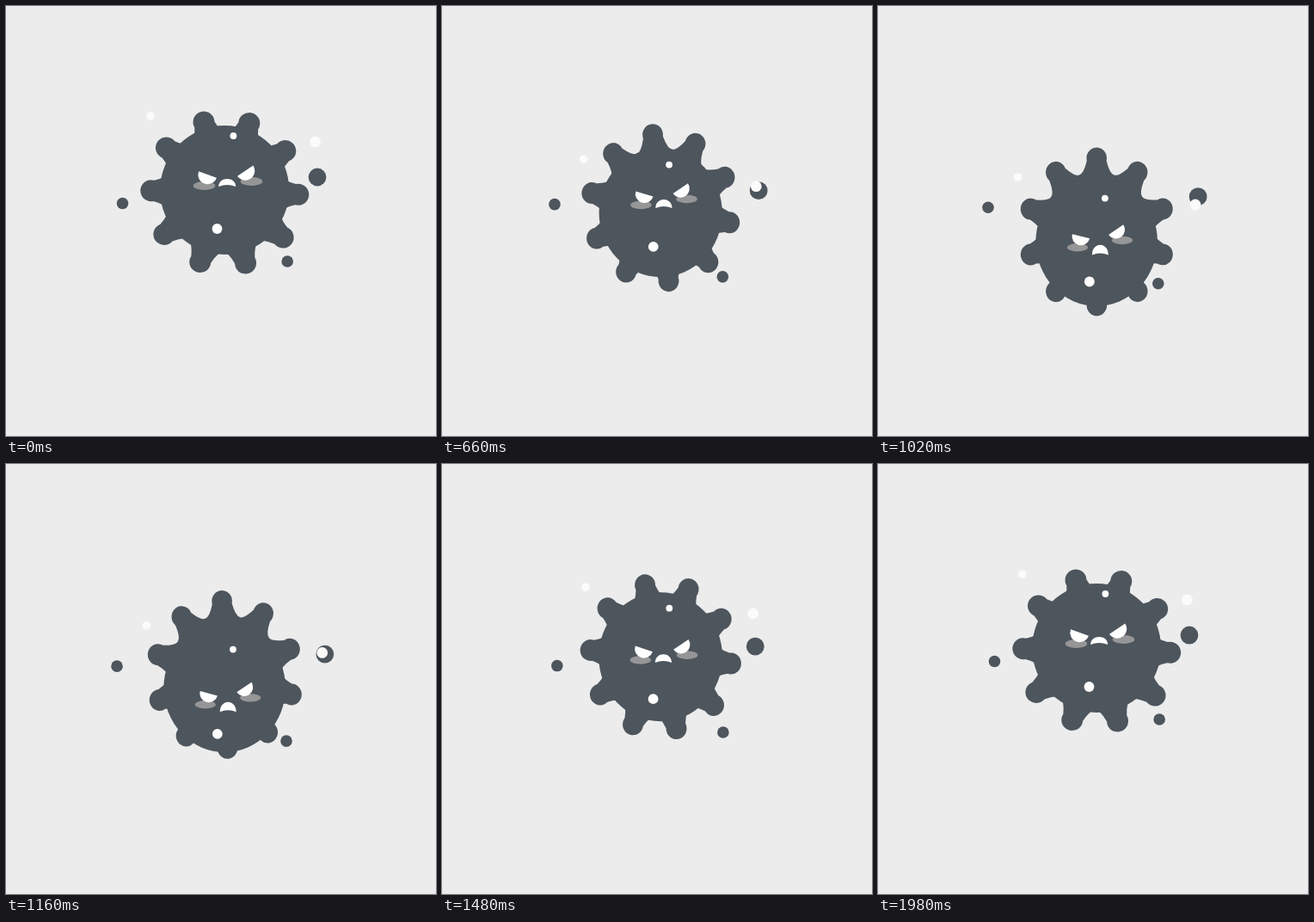
Write an HTML page with a canvas that moves like this. It is 500x500 px and loops after 2000 ms.

```html
<!DOCTYPE html>
<html>
<head>
<meta charset="utf-8">
<style>
html, body { margin: 0; width: 100%; height: 100%; overflow: hidden; background: #ececec; }
canvas { display: block; }
</style>
</head>
<body>
<canvas width="500" height="500"></canvas>
<script>
const ctx = document.querySelector('canvas').getContext('2d');
const DARK = '#4d555d', LIGHT = '#fbfbfb', WHITE = '#fff', BLUSH = '#969697';
const LOOP = 2000, RAD = Math.PI / 180;

// Easing like cubic-bezier(x1, 0, x2, 1), solved by bisection
const ease = (x1, x2) => x => {
  let lo = 0, hi = 1, u;
  for (let i = 0; i < 20; i++) {
    u = (lo + hi) / 2;
    const at = 3 * u * (1 - u) * ((1 - u) * x1 + u * x2) + u ** 3;
    if (at < x) lo = u; else hi = u;
  }
  return u * u * (3 - 2 * u);
};
const smooth = ease(.37, .63), settle = ease(.2, .18);

// Goes from 0 up to 1 at the peak, then back to 0 at the end of the loop
const pulse = (start, peak, rise = smooth, fall = settle) => t =>
  t < start ? 0
  : t < peak ? rise((t - start) / (peak - start))
  : 1 - fall((t - peak) / (LOOP - peak));

const spikesDrop = pulse(0, 1000, ease(.83, .76), ease(.12, .1));
const coreDrop = pulse(0, 1000, ease(.85, .65), ease(.25, .1));
const faceDrop = pulse(400, 1100);
const swing = pulse(150, 1050);
const drift = pulse(0, 1060, smooth, smooth);
const float = pulse(0, 1040);
const lag = pulse(400, 1300, smooth, smooth);

const dots = [
  { x: 135.5, y: 229.5, dx: -7.5, dy: 6, r: 6.8, color: DARK, move: lag },
  { x: 362, y: 199, dx: 10.2, dy: 22.7, r: 10.4, color: DARK, move: drift },
  { x: 327.2, y: 297, dx: -1.4, dy: 25.8, r: 6.8, color: DARK, move: drift },
  { x: 168, y: 128, dx: -5.5, dy: 71, r: 4.8, color: LIGHT, move: float },
  { x: 359.5, y: 158, dx: 9.5, dy: 73, r: 6.4, color: LIGHT, move: float },
  { x: 264.4, y: 151, dx: -.5, dy: 73, r: 3.9, color: WHITE, move: pulse(300, 1060) },
  { x: 245.5, y: 259, dx: .4, dy: 62, r: 5.9, color: WHITE, move: pulse(400, 1060) },
];

function oval(x, y, rx, ry, color) {
  ctx.fillStyle = color;
  ctx.beginPath();
  ctx.ellipse(x, y, rx, ry, 0, 0, 7);
  ctx.fill();
}

function drawSpikes(y, degrees, squeeze) {
  ctx.save();
  ctx.translate(254.3, y);
  ctx.scale(squeeze, 1);
  ctx.rotate(degrees * RAD);
  ctx.fillStyle = DARK;
  ctx.beginPath();
  for (let i = 0; i < 10; i++) {
    ctx.lineTo(-21.3, -66);
    ctx.quadraticCurveTo(-16, -67.5, -12.1, -82.4);
    ctx.arc(0, -85.5, 12.5, Math.PI - .25, .25);
    ctx.quadraticCurveTo(16, -67.5, 21.3, -66);
    ctx.rotate(Math.PI / 5);
  }
  ctx.fill();
  ctx.restore();
}

function drawEye(x, y, r, degrees) {
  ctx.fillStyle = WHITE;
  ctx.beginPath();
  ctx.arc(x, y, r, degrees * RAD, degrees * RAD + Math.PI);
  ctx.fill();
}

function drawMouth(x, y, w, h) {
  ctx.fillStyle = WHITE;
  ctx.beginPath();
  ctx.moveTo(x - w, y);
  ctx.bezierCurveTo(x - w, y - h / .75, x + w, y - h / .75, x + w, y);
  ctx.quadraticCurveTo(x, y - 4, x - w, y);
  ctx.fill();
}

function drawFace(drop, turn, squeeze) {
  const leftX = 230.5 + 1.5 * turn, rightX = 285.5 - 1.5 * turn;
  const leftY = 209 + 74 * drop, rightY = leftY - 5 - 3.3 * turn;
  oval(leftX, leftY, 12.8 * squeeze, 5 * squeeze, BLUSH);
  oval(rightX, rightY, 12.8 * squeeze, 5 * squeeze, BLUSH);
  drawEye(leftX + 4, leftY - 13, 11.1 * squeeze, 20 - 6 * turn);
  drawEye(rightX - 7.3, rightY - 12.3, 11 * squeeze, -34);
  drawMouth(257.2 + 1.2 * turn, 210 + 82 * drop, 10 * squeeze, 9 + 2.8 * drop);
}

function draw(t) {
  const turn = swing(t), squeeze = 1 - .057 * drift(t) ** .6;
  ctx.clearRect(0, 0, 500, 500);
  drawSpikes(217 + 46 * spikesDrop(t), 16.5 * (turn - 1), squeeze);
  oval(254.2, 214 + 60 * coreDrop(t), 75 * squeeze, 75, DARK);
  for (const { x, y, dx, dy, r, color, move } of dots) {
    oval(x + dx * turn, y + dy * move(t), r, r, color);
  }
  drawFace(faceDrop(t), turn, squeeze);
}

const start = performance.now();
function loop() {
  draw((performance.now() - start) % LOOP);
  requestAnimationFrame(loop);
}
loop();
</script>
</body>
</html>
```
